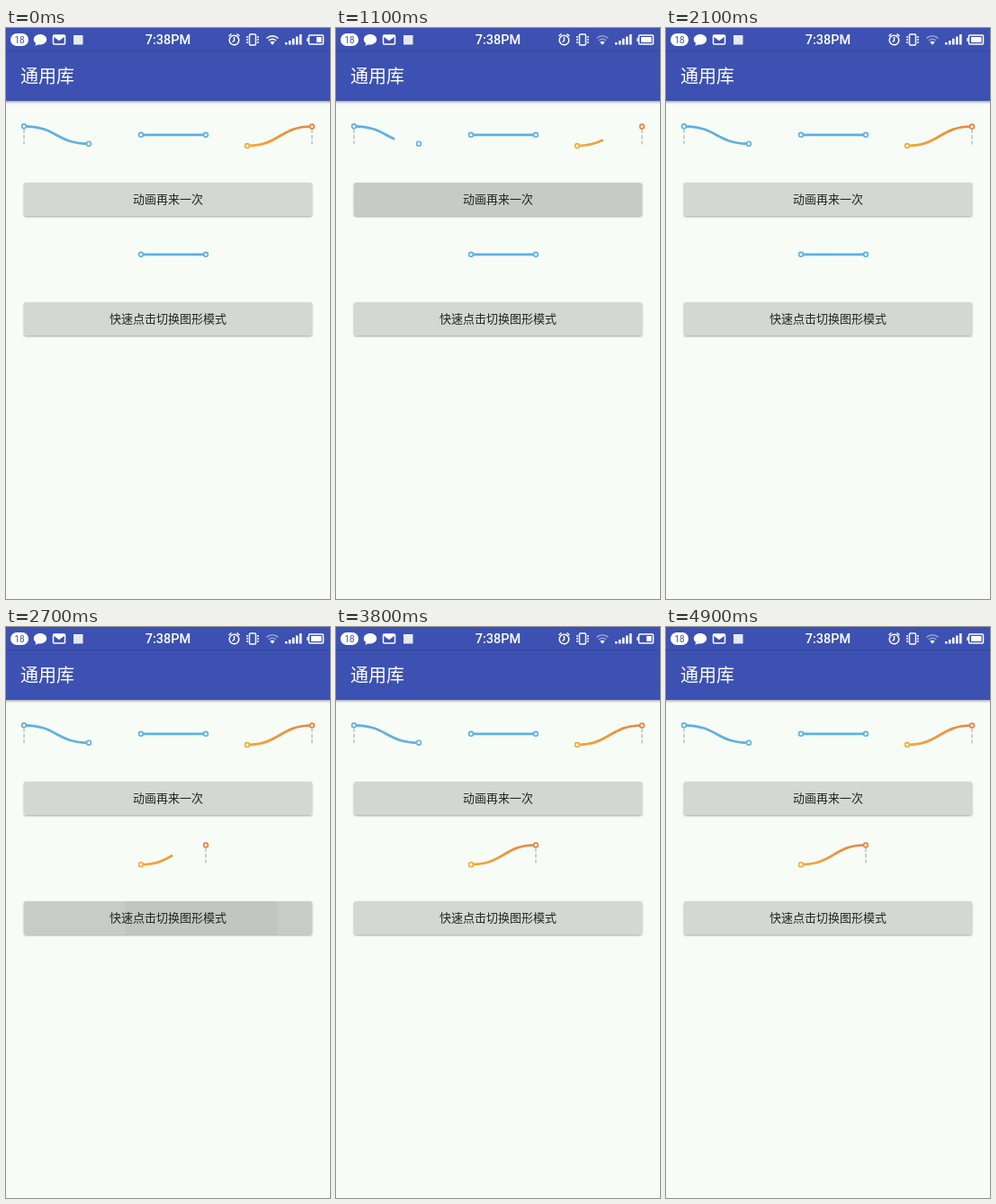
These frames come from a looping animation (360x635 px, 5 s). An HTML page:

```html
<!DOCTYPE html>
<html lang="zh">
<head>
<meta charset="utf-8">
<title>通用库</title>
<style>
  html, body { margin: 0; width: 100%; height: 100%; overflow: hidden; background: #f7fcf7; }
  svg { display: block; width: 360px; height: 635px; }
  text { font-family: "Noto Sans CJK SC", "Noto Sans CJK", sans-serif; }
  .label { font-size: 13px; font-weight: 500; fill: #222522; text-anchor: middle; }
  .icon { fill: none; stroke: #fff; stroke-width: 1.5; }
  .line { fill: none; stroke-width: 2.7; }
  .drop { stroke: #b5b9b6; stroke-width: 1.3; stroke-dasharray: 4.5 2; }
  .node { fill: #fff; stroke-width: 1.6; }
</style>
</head>
<body>
<svg viewBox="0 0 360 635">
  <defs>
    <linearGradient id="barShadow" x2="0" y2="1">
      <stop stop-color="#1c2450" stop-opacity=".4"/>
      <stop offset=".5" stop-color="#000" stop-opacity=".1"/>
      <stop offset="1" stop-color="#000" stop-opacity="0"/>
    </linearGradient>
    <filter id="lift" x="-5%" y="-20%" width="110%" height="150%">
      <feDropShadow dx="0" dy="1" stdDeviation="1" flood-opacity=".35"/>
    </filter>
  </defs>
  <rect width="360" height="635" fill="#f7fcf7"/>
  <rect y="81" width="360" height="4" fill="url(#barShadow)"/>
  <rect width="360" height="81" fill="#3c51b1"/>
  <rect y="25" width="360" height="1" fill="#344799"/>
  <text x="16" y="61" font-size="20" fill="#fff">通用库</text>

  <g id="status">
    <rect x="5" y="6" width="20" height="14" rx="7" fill="#fff"/>
    <text x="15" y="16.6" font-size="10" text-anchor="middle" fill="#3c51b1" style="font-family:Roboto,sans-serif">18</text>
    <path d="M38 7c4 0 7.200 2.600 7.200 5.800s-3.200 5.800-7.200 5.800l-2-.2-3.600 1.300.9-2.600c-1.500-1-2.500-2.500-2.500-4.300C30.800 9.600 34 7 38 7Z" fill="#fff"/>
    <rect class="icon" x="52.500" y="8" width="13" height="10" rx="1"/>
    <path d="M53 8h12v1.800l-6 4.400-6-4.400Z" fill="#fff"/>
    <rect x="75" y="8" width="10.500" height="10.500" fill="#e4e8f4"/>
    <text x="180" y="18" font-size="14.500" font-weight="500" text-anchor="middle" fill="#fff" style="font-family:Roboto,sans-serif">7:38PM</text>
    <g class="icon">
      <circle cx="253.500" cy="13.500" r="5.300"/>
      <path d="M253.500 10v4l-2 1.500M247.500 9l3-2.500M259.500 9l-3-2.500"/>
      <rect x="270.500" y="7" width="7" height="12" rx="1"/>
      <path d="M268 9v8M280 9v8" stroke-dasharray="2 1"/>
      <path id="wifi" d="M289.500 11.500q6.500-5.500 13 0M291.800 14q4.200-3.400 8.400 0"/>
      <rect x="336.500" y="8" width="16" height="10" rx="1"/>
      <path d="M335 11v4"/>
    </g>
    <path d="M293.300 15.800q2.700-2 5.400 0L296 18.800Z" fill="#fff"/>
    <path d="M310 18.500v-2.500h2.600v2.500ZM314 18.500v-4.500h2.600v4.500ZM318 18.500v-6.700h2.600v6.700ZM322 18.500v-9h2.600v9ZM326 18.500v-11.500h2.600v11.500Z" fill="#fff"/>
    <rect id="charge" y="10" height="6" fill="#fff"/>
  </g>
  <g id="content"></g>
</svg>
<script>
const LOOP = 5000;
const BLUE = ['#5eafe4', '#66b1d8'], SKY = ['#5cb0e6', '#5cb0e6'], ORANGE = ['#f3aa36', '#e9823f'];
const content = document.getElementById('content');
const charge = document.getElementById('charge');
const wifi = document.getElementById('wifi');
const clamp = v => Math.max(0, Math.min(1, v));

function add(parent, tag, attrs) {
  const node = document.createElementNS('http://www.w3.org/2000/svg', tag);
  for (const key in attrs) node.setAttribute(key, attrs[key]);
  parent.append(node);
  return node;
}

let ids = 0;

// A connector between two nodes; the higher end of a bent one has a dashed drop line.
function connector(x, y1, y2, colors, duration) {
  const end = x + 72, mid = x + 36, id = 'tint' + ids++;
  const group = add(content, 'g', {});
  const tint = add(group, 'linearGradient', { id, gradientUnits: 'userSpaceOnUse', x1: x, x2: end, y1: 0, y2: 0 });
  colors.forEach((color, i) => add(tint, 'stop', { offset: i, 'stop-color': color }));
  if (y1 !== y2) {
    const top = Math.min(y1, y2), dx = y1 < y2 ? x : end;
    add(group, 'path', { class: 'drop', d: `M${dx} ${top + 3}v17` });
  }
  const line = add(group, 'path', {
    class: 'line', pathLength: 1, stroke: `url(#${id})`,
    d: `M${x} ${y1}C${mid} ${y1} ${mid} ${y2} ${end} ${y2}`
  });
  add(group, 'circle', { class: 'node', cx: x, cy: y1, r: 2.4, stroke: colors[0] });
  add(group, 'circle', { class: 'node', cx: end, cy: y2, r: 2.4, stroke: colors[1] });
  return {
    show: on => group.setAttribute('display', on ? 'inline' : 'none'),
    draw: age => line.setAttribute('stroke-dasharray', `${clamp(age / duration)} 2`)
  };
}

function button(y, label, touchX, presses) {
  const box = { x: 20, y, width: 320, height: 37, rx: 2 };
  const clip = add(content, 'clipPath', { id: 'clip' + y });
  add(clip, 'rect', box);
  add(content, 'rect', { ...box, fill: '#d3d8d2', filter: 'url(#lift)' });
  const shade = add(content, 'rect', { ...box, fill: '#000' });
  const ripple = add(add(content, 'g', { 'clip-path': `url(#clip${y})` }), 'circle', { cx: touchX, cy: y + 18.5, fill: '#000' });
  add(content, 'text', { class: 'label', x: 180, y: y + 23.3 }).textContent = label;
  return t => {
    const dark = age => age < 0 ? 0 : clamp(age / 120) * clamp((850 - age) / 350);
    shade.setAttribute('opacity', .055 * Math.max(...presses.map(p => dark(t - p))));
    const age = t - Math.max(...presses.filter(p => p <= t), -LOOP);
    ripple.setAttribute('r', 230 * clamp(age / 460) ** 3);
    ripple.setAttribute('opacity', .03 * clamp((480 - age) / 100));
  };
}

const topRow = [
  connector(20, 109.3, 128.7, BLUE, 615),
  connector(150, 118.8, 118.8, SKY, 333),
  connector(268, 131, 109.5, ORANGE, 1000)
];
const straight = connector(150, 251.8, 251.8, SKY, 333);
const bent = connector(150, 264.2, 242.5, ORANGE, 1000);
const buttons = [
  button(172, '动画再来一次', 239, [640, 3790]),
  button(305, '快速点击切换图形模式', 217, [2150, 2370])
];

function render(t) {
  const start = t < 710 ? -LOOP : t < 3860 ? 710 : 3860;
  topRow.forEach(c => c.draw(t - start));
  const switched = t >= 2215;
  straight.show(!switched);
  straight.draw(LOOP);
  bent.show(switched);
  bent.draw(t - 2215);
  buttons.forEach(update => update(t));

  const half = t < 650 || (t >= 3000 && t < 4450);
  charge.setAttribute('x', half ? 345 : 339);
  charge.setAttribute('width', half ? 5.5 : 11.5);
  wifi.setAttribute('opacity', t < 700 ? 1 : .45);
}

const begin = performance.now();
function tick() {
  render((performance.now() - begin) % LOOP);
  requestAnimationFrame(tick);
}
tick();
</script>
</body>
</html>
```
